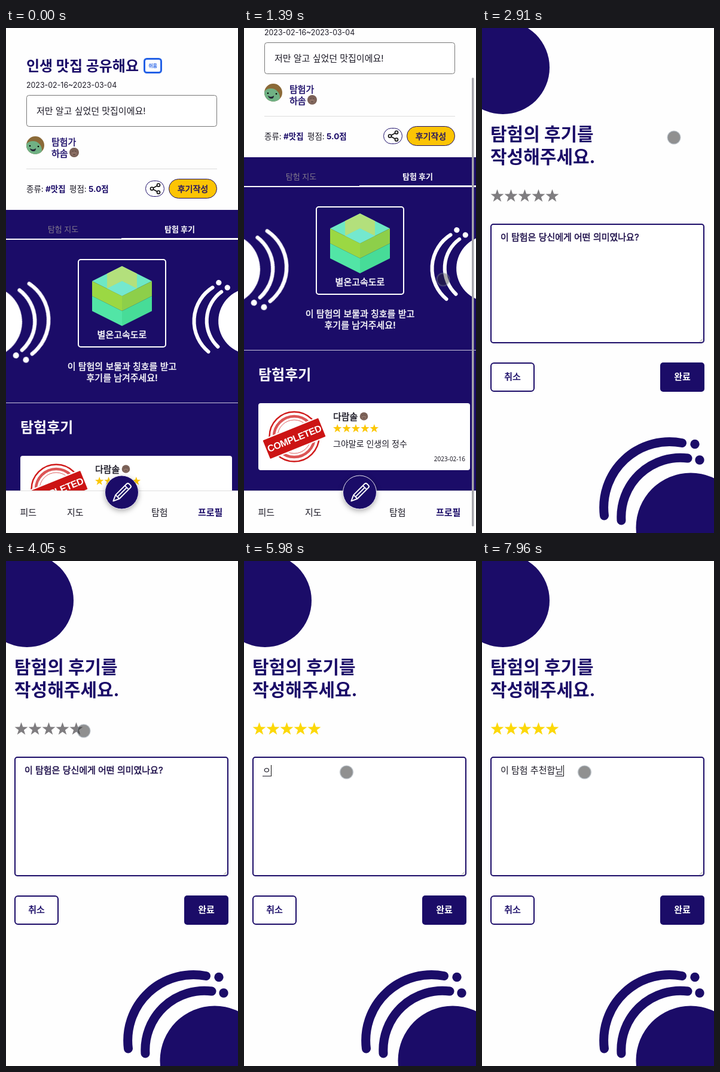
Write an HTML page that moves like this. It is 388x844 px and loops after 8000 ms.

```html
<!DOCTYPE html>
<html lang="ko">
<head>
<meta charset="utf-8">
<title>탐험 후기</title>
<style>
:root { --navy: #1b0c68; }
html, body { margin: 0; width: 100%; height: 100%; overflow: hidden; background: #fefefe; }
#stage { position: relative; width: 388px; height: 844px; overflow: hidden; color: #1c1a26; }
svg { position: absolute; left: 0; top: 0; display: block; }
#stage, text { font-family: Inter, 'Noto Sans CJK KR', 'Noto Sans CJK', sans-serif; font-size: 15px; }
text { fill: currentColor; white-space: pre; }
.navy { color: var(--navy); fill: var(--navy); }
.white { color: #fff; fill: #fff; }
.mid { text-anchor: middle; }
.med { stroke: currentColor; stroke-width: .45px; }
.bold { font-weight: 700; }
.s13 { font-size: 13px; }
.s14 { font-size: 14px; }
.info { font-size: 13.5px; }
.s24 { font-size: 24px; font-weight: 700; }
.s30 { font-size: 30px; font-weight: 700; }
.fab { filter: drop-shadow(0 3px 4px rgba(0, 0, 0, .3)); }

#scroll, #bar, #thumb, #form, #hint, #rating, #touch, #caret, #done::before, #now::before {
  animation: 8s linear infinite;
}
#scroll { animation-name: scroll; }
#bar { animation-name: bar; }
#thumb { animation-name: thumb; }
#touch { animation-name: touch; opacity: 0; }
#form { animation-name: form; }
#hint { animation-name: hint; }
#rating { animation-name: rating; fill: #7f7d80; }
#caret { animation-name: caret; }
#done::before { animation-name: done; }
#now::before { animation-name: now; }
#form, #hint, #rating, #caret, #done::before, #now::before { animation-timing-function: step-end; }

@keyframes scroll {
  0%, 11.9% { transform: translateY(0); animation-timing-function: ease-in-out; }
  16%, 100% { transform: translateY(-88px); }
}
@keyframes thumb {
  0%, 11.9% { transform: translateY(0); animation-timing-function: ease-in-out; }
  16%, 100% { transform: translateY(80px); }
}
@keyframes bar {
  0%, 11.8% { opacity: 0; }
  12.5%, 18.6% { opacity: 1; }
  20.6%, 100% { opacity: 0; }
}
@keyframes touch {
  0%, 1.6% { transform: translate(396px, 792px); opacity: 0; }
  1.63% { transform: translate(386px, 792px); opacity: 1; }
  4% { transform: translate(366px, 590px); }
  6.8% { transform: translate(350px, 330px); }
  7.4% { transform: translate(346px, 316px); }
  8.25%, 10.7% { transform: translate(346px, 340px); }
  11.6%, 12.2% { transform: translate(346px, 361px); opacity: 1; }
  17.3% { transform: translate(333px, 420px); opacity: .75; }
  20.6%, 21.4% { transform: translate(335px, 430px); animation-timing-function: ease-in; }
  25% { transform: translate(370px, 310px); animation-timing-function: ease-out; }
  29.75%, 32.6% { transform: translate(322px, 186px); opacity: 1; }
  33%, 36.2% { transform: translate(321px, 183px); opacity: .55; }
  36.3%, 41.4% { transform: translate(321px, 183px); opacity: 1; animation-timing-function: ease-in-out; }
  48.2% { transform: translate(146px, 296px); }
  50.6%, 54% { transform: translate(130px, 284px); animation-timing-function: ease-in-out; }
  60.5%, 100% { transform: translate(171.5px, 353px); opacity: 1; }
}
@keyframes form {
  0% { visibility: hidden; }
  36.3%, 100% { visibility: visible; }
}
@keyframes rating {
  0% { fill: #7f7d80; }
  53%, 100% { fill: #fcd808; }
}
@keyframes hint {
  0% { opacity: 1; }
  74.7%, 100% { opacity: 0; }
}
@keyframes caret {
  0% { opacity: 0; }
  65.5% { opacity: 1; }
  72.1% { opacity: 0; }
  74.7%, 100% { opacity: 1; }
}
@keyframes done {
  0% { content: ''; }
  76.3% { content: '이 '; }
  82.1% { content: '이 탐'; }
  84.6% { content: '이 탐험 '; }
  90.3% { content: '이 탐험 추'; }
  94.5% { content: '이 탐험 추천'; }
  97%, 100% { content: '이 탐험 추천합'; }
}
@keyframes now {
  0% { content: ''; }
  74.7% { content: 'ㅇ'; }
  75.5% { content: '이'; }
  76.3% { content: ''; }
  78.8% { content: 'ㅌ'; }
  79.7% { content: '타'; }
  80.5% { content: '탐'; }
  82.1% { content: 'ㅎ'; }
  83.8% { content: '험'; }
  84.6% { content: ''; }
  87.1% { content: 'ㅊ'; }
  87.8% { content: '추'; }
  89.6% { content: '춫'; }
  90.3% { content: '처'; }
  92% { content: '천'; }
  92.8% { content: '첞'; }
  94.5% { content: '하'; }
  96.1% { content: '합'; }
  97% { content: 'ㄴ'; }
  97.8% { content: '니'; }
  99.45%, 100% { content: '닏'; }
}
#typed { position: absolute; left: 31px; top: 340px; margin: 0; line-height: 20px; white-space: pre; }
#done::before, #now::before { content: ''; }
#now { text-decoration: underline 1px; text-underline-offset: 4px; }
#caret { position: absolute; top: 1px; width: 1px; height: 19px; background: #111; }
</style>
</head>
<body>
<div id="stage">
<svg width="388" height="844" viewBox="0 0 388 844">
  <defs>
    <path id="star" d="M0-10 2.4-3.2 9.5-3.1 3.8 1.2 5.9 8.1 0 4-5.9 8.1-3.8 1.2-9.5-3.1-2.4-3.2Z"/>
    <g id="face">
      <circle r="8" fill="#7b6157"/>
      <ellipse cy="2" rx="4.5" ry="3.6" fill="#8c7065"/>
      <path d="M-3-2h1.6M1.4-2H3M-2 3.4h4" stroke="#4c3b36" fill="none"/>
    </g>
    <g id="swirl">
      <circle r="91.5" stroke="none"/>
      <circle cx="7" cy="-139.5" r="7.7" stroke="none"/>
      <circle cx="15" cy="-113" r="7.7" stroke="none"/>
      <path d="M-144.5-20A110 110 0 0 1-14.500-141.5M-116-12A99 99 0 0 1-5-116" fill="none" stroke="currentColor" stroke-linecap="round"/>
    </g>
    <clipPath id="round"><circle cx="49" cy="196" r="15"/></clipPath>
  </defs>

  <g id="scroll">
    <rect width="388" height="304" fill="#fefefe"/>
    <text x="34" y="72" class="navy s24">인생 맛집 공유해요</text>
    <rect x="231.5" y="51.5" width="28" height="23" rx="4" fill="#fff" stroke="#2461e6" stroke-width="3"/>
    <text x="245.5" y="66" class="mid bold" style="font-size:8px;fill:#2461e6">쉬움</text>
    <text x="34" y="100" style="font-size:12.4px">2023-02-16~2023-03-04</text>
    <rect x="34.5" y="112.5" width="318" height="52" rx="4" fill="#fff" stroke="#777"/>
    <text x="51" y="144">저만 알고 싶었던 맛집이에요!</text>

    <g clip-path="url(#round)">
      <rect x="34" y="181" width="30" height="30" fill="#8b6a38"/>
      <ellipse cx="45" cy="204" rx="15" ry="15" fill="#70b184"/>
      <circle cx="40" cy="197" r="1.3"/><circle cx="54" cy="198" r="1.3"/>
      <path d="M40 201q5 4 10 0 0 5-4 5-5 0-6-5Z" fill="#223"/>
    </g>
    <text x="76" y="196" class="med navy">탐험가</text>
    <text x="76" y="215" class="med navy">하솜</text>
    <use href="#face" x="114" y="208"/>
    <path d="M34 235.5H353" stroke="#dcdcdc"/>

    <text x="34" y="274" class="info">종류:</text>
    <text x="66" y="274" class="info bold navy">#맛집</text>
    <text x="106" y="274" class="info">평점:</text>
    <text x="138" y="274" class="info bold navy">5.0점</text>
    <rect x="233.5" y="255.5" width="31" height="26" rx="13" fill="#fff" stroke="#1b0c68"/>
    <g fill="#fff" stroke="#111" stroke-width="1.7">
      <path d="M255 262.5 244 268.5 255 274.5" fill="none"/>
      <circle cx="255" cy="262.5" r="2.5"/><circle cx="244" cy="268.5" r="2.5"/><circle cx="255" cy="274.5" r="2.5"/>
    </g>
    <rect x="272.5" y="252.5" width="80" height="32" rx="16" fill="#fcc404" stroke="#1b0c68"/>
    <text x="312.5" y="274" class="s14 mid med navy">후기작성</text>

    <rect y="304" width="388" height="640" class="navy"/>
    <text x="95.5" y="341" class="s13 mid" style="fill:#80788c">탐험 지도</text>
    <text x="290.5" y="341" class="s13 mid bold white">탐험 후기</text>
    <path d="M0 352h193v-1h195v3H0Z" fill="#fff"/>

    <g class="white">
      <use href="#swirl" transform="translate(-33.4 491) rotate(130.7) scale(.66)" stroke-width="9.6"/>
      <use href="#swirl" transform="translate(410.5 490) rotate(-43.2) scale(.605)" stroke-width="10"/>
    </g>

    <rect x="121" y="387" width="146" height="146" rx="4" fill="none" stroke="#fff" stroke-width="2"/>
    <path d="M194 398 244 423 194 448 144 423Z" fill="#6ee8c4"/>
    <path d="M194 398 219 410.5V435.5L194 423 169 435.5V410.5Z" fill="#b3e07c"/>
    <path d="M194 423 219 435.5 194 448 169 435.5Z" fill="#74e8cf"/>
    <path d="M144 423 194 448V473L144 448Z" fill="#9bd843"/>
    <path d="M244 423 194 448V473L244 448Z" fill="#8dcf4a"/>
    <path d="M144 448 194 473V498L144 473Z" fill="#52e5a6"/>
    <path d="M244 448 194 473V498L244 473Z" fill="#47dc98"/>
    <text x="194" y="518" class="mid med white">별온고속도로</text>
    <text x="194" y="571" class="mid med white">이 탐험의 보물과 칭호를 받고</text>
    <text x="194" y="590" class="mid med white">후기를 남겨주세요!</text>
    <path d="M0 626.5H388" stroke="#c9c6dc"/>
    <text x="24" y="676" class="s24 white">탐험후기</text>

    <rect x="24" y="715" width="354" height="112" rx="4" fill="#fff"/>
    <g transform="translate(84 771)">
      <g fill="none" stroke="#d01c1c">
        <circle r="41.5" stroke-width="2.5"/>
        <circle r="34" stroke-width="4.5" opacity=".75"/>
        <circle r="28" opacity=".7"/>
      </g>
      <g transform="translate(0 3) rotate(-22)">
        <rect x="-50" y="-18.5" width="100" height="37" fill="#fff"/>
        <rect x="-50" y="-16.5" width="100" height="33" rx="1" fill="#cc1414"/>
        <text y="5.8" class="mid white" style="font:bold 16px 'Liberation Sans',sans-serif;letter-spacing:-.5px">COMPLETED</text>
      </g>
    </g>
    <text x="149" y="743" class="med">다람솔</text>
    <use href="#face" transform="translate(200.5 737) scale(.85)"/>
    <g id="small" fill="#fcc704"></g>
    <text x="149" y="788" class="s14">그야말로 인생의 정수</text>
    <text x="370" y="812" text-anchor="end" style="font:10px 'Noto Sans',sans-serif">2023-02-16</text>
  </g>

  <g>
    <rect y="773" width="388" height="71" fill="#fefefe"/>
    <path d="M0 773.5H388" stroke="#dedede"/>
    <text x="23.5" y="815">피드</text>
    <text x="102" y="815">지도</text>
    <text x="243" y="815">탐험</text>
    <text x="321" y="815" class="bold navy">프로필</text>
    <circle class="navy fab" cx="193.5" cy="776" r="28" stroke="#e8e6f2"/>
    <path transform="translate(193.5 776.5) rotate(45)" d="M-4.5 10V-16q0-3 3-3h3q3 0 3 3V10L0 20ZM-4.5-12h9M-4.5 10h9M0-12V10"
      fill="none" stroke="#fff" stroke-width="1.9" stroke-linejoin="round"/>
  </g>
  <g id="bar"><rect id="thumb" x="381" y="3" width="3.5" height="750" rx="1.7" fill="#a5a5ab"/></g>

  <g id="form">
    <rect width="388" height="844" fill="#fefefe"/>
    <circle class="navy" cx="35" cy="66" r="78"/>
    <use href="#swirl" class="navy" x="349" y="835" stroke-width="15"/>
    <text x="14" y="188" class="s30 navy">탐험의 후기를</text>
    <text x="14" y="226" class="s30 navy">작성해주세요.</text>
    <g id="rating"></g>
    <rect x="15" y="328" width="356" height="198" rx="4" fill="#fff" stroke="#1b0c68" stroke-width="2"/>
    <path d="M364 524.5l5-5M367 524.5l2-2" stroke="#777" stroke-width=".8"/>
    <text id="hint" x="31" y="355" class="med" color="#1b0c48">이 탐험은 당신에게 어떤 의미였나요?</text>
    <rect x="15" y="560" width="72" height="47" rx="5" fill="#fff" stroke="#1b0c68" stroke-width="2"/>
    <text x="51" y="588" class="mid med navy">취소</text>
    <rect x="298" y="559" width="74" height="49" rx="5" class="navy"/>
    <text x="335" y="588" class="mid bold white">완료</text>
  </g>
</svg>
<p id="typed"><span id="done"></span><span id="now"></span><i id="caret"></i></p>
<svg width="388" height="844" viewBox="0 0 388 844">
  <circle id="touch" r="10.5" fill="rgba(45,45,45,.53)" stroke="rgba(140,150,160,.5)" stroke-width="2"/>
</svg>
</div>
<script>
function stars(id, x, y, gap, size) {
  let html = '';
  for (let i = 0; i < 5; i++)
    html += `<use href="#star" transform="translate(${x + i * gap} ${y}) scale(${size})"/>`;
  document.getElementById(id).innerHTML = html;
}
stars('small', 156.2, 757.5, 15.4, .76);
stars('rating', 25.5, 281, 23, 1.15);
</script>
</body>
</html>
```
